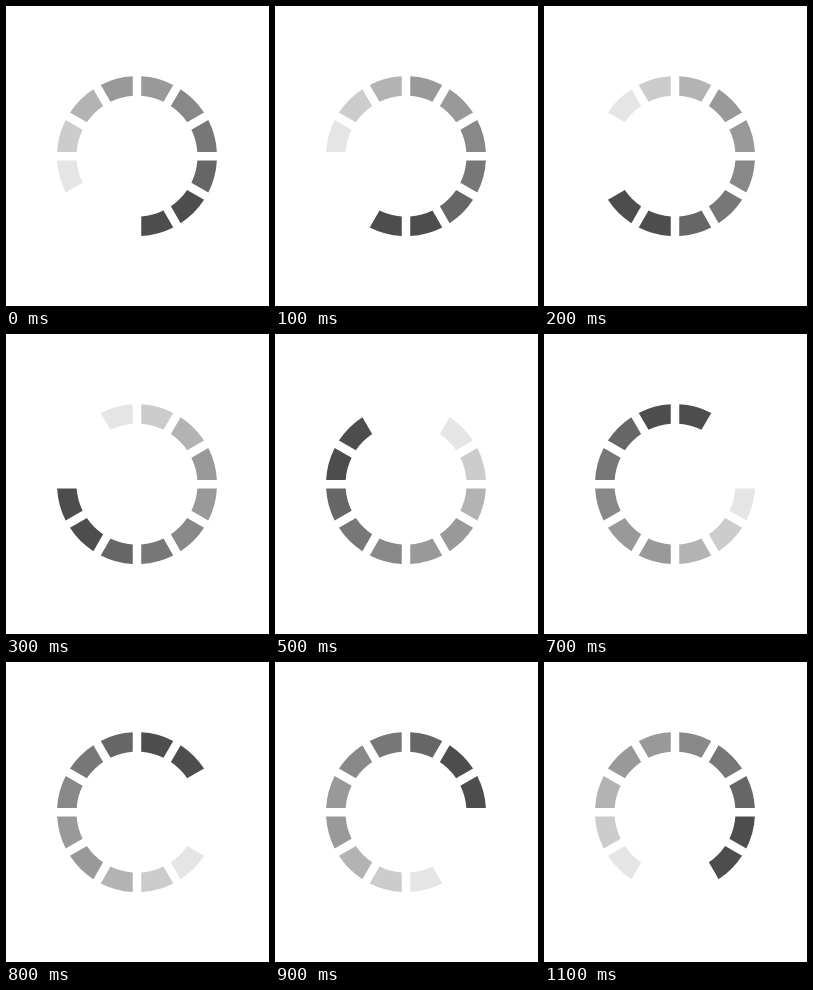
Recreate the animation shown at these times as an HTML page with a canvas. Size 263 by 300 pixels, loop 1.2 s.

```html
<!DOCTYPE html>
<html lang="en">
<head>
<meta charset="utf-8">
<title>Spinner</title>
<style>
  html, body { margin: 0; width: 100%; height: 100%; overflow: hidden; background: #fff; }
  canvas { display: block; }
</style>
</head>
<body>
<canvas width="263" height="300"></canvas>
<script>
const ctx = document.querySelector('canvas').getContext('2d');
const CX = 131, CY = 150.2, INNER = 60.5, OUTER = 80, GAP = 8.5;
const COUNT = 12, STEP_MS = 100, START = 5;
// Shades from the head of the tail to its end; the remaining segments are empty.
const SHADES = ['#4d4d4d', '#4d4d4d', '#666', '#777', '#888', '#999', '#999', '#b3b3b3', '#ccc', '#e5e5e5'];

// Segment 0 begins at twelve o'clock; the gaps have parallel sides.
function drawSegment(index, color) {
  const slice = 2 * Math.PI / COUNT;
  const from = index * slice - Math.PI / 2;
  const outerInset = Math.asin(GAP / 2 / OUTER);
  const innerInset = Math.asin(GAP / 2 / INNER);
  ctx.beginPath();
  ctx.arc(CX, CY, OUTER, from + outerInset, from + slice - outerInset);
  ctx.arc(CX, CY, INNER, from + slice - innerInset, from + innerInset, true);
  ctx.fillStyle = color;
  ctx.fill();
}

function draw() {
  const step = Math.floor(performance.now() / STEP_MS) % COUNT;
  ctx.fillStyle = '#fff';
  ctx.fillRect(0, 0, 263, 300);
  SHADES.forEach((color, i) => drawSegment((START + step - i + COUNT) % COUNT, color));
  requestAnimationFrame(draw);
}
draw();
</script>
</body>
</html>
```
